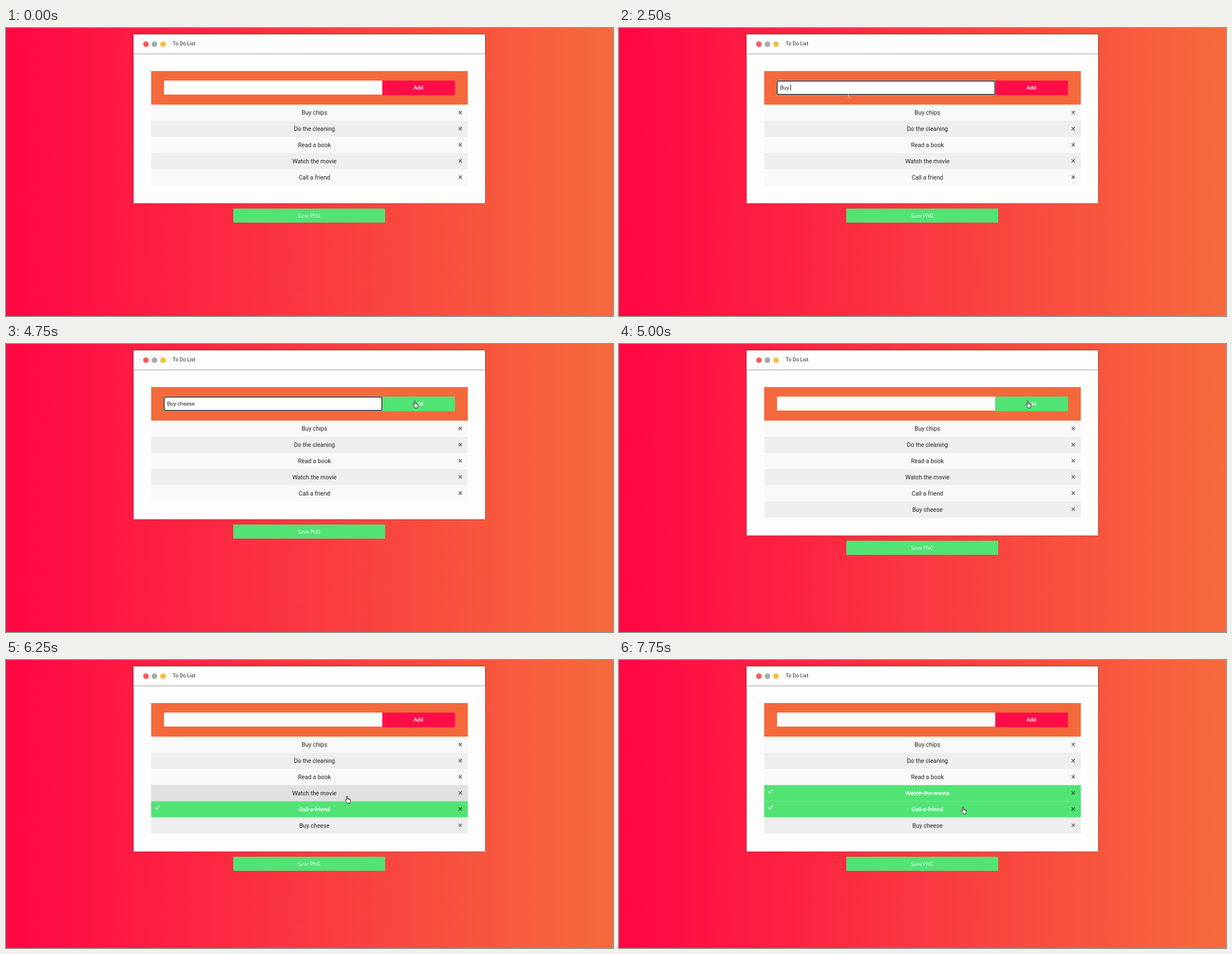
An HTML page that plays this animation: 1087x515 px, repeating every 8 s.

```html
<!DOCTYPE html>
<html lang="en">
<head>
<meta charset="utf-8">
<title>To Do List</title>
<style>
  html, body { margin: 0; width: 100%; height: 100%; overflow: hidden; }
  svg { display: block; width: 1087px; height: 515px; background: linear-gradient(to right, #ff0844 2%, #f56b3c); }
  text { font-family: Roboto, "Open Sans", sans-serif; white-space: pre; fill: #212121; }
  .card { fill: #fdfdfd; filter: drop-shadow(0 0 1.2px rgba(0, 0, 0, .6)); }
  .title { font-size: 9.15px; }
  .entry { font-size: 9.75px; }
  .task { font-size: 10.7px; text-anchor: middle; }
  .button { font-size: 9.6px; font-weight: 500; text-anchor: middle; fill: #fff; }
  .save { font: 8.9px "Open Sans", "Noto Sans", sans-serif; }
  .done { fill: #fff; text-decoration: line-through; }
  .line { fill: none; stroke-linecap: square; }
</style>
</head>
<body>
<svg id="stage" viewBox="0 0 1087 515"></svg>
<script>
const stage = document.getElementById('stage');
const STEP = 250, LOOP = 8000, GREEN = '#51e374', RED = '#ff0d49';
const TASKS = ['Buy chips', 'Do the cleaning', 'Read a book', 'Watch the movie', 'Call a friend', 'Buy cheese'];

// [start time, value]: each value holds until the next start
const TYPED = [[0, ''], [1750, 'B'], [2000, 'Bu'], [2250, 'Buy'], [2500, 'Buy '], [3000, 'Buy c'],
  [3250, 'Buy che'], [3500, 'Buy chees'], [3750, 'Buy cheese'], [5000, '']];
const CARET = [[0, false], [250, true], [1000, false], [1500, true], [4250, false]];
const HOVER = [[0, -1], [5500, 2], [5750, 4], [6250, 3], [7250, 4]];
const POINTER = [[0, ''], [500, 'beam', 408, 117], [4250, 'arrow', 633, 132], [4500, 'hand', 712, 102],
  [4750, 'hand', 728, 101], [5250, 'hand', 726, 103], [5500, 'hand', 652, 204], [5750, 'hand', 605, 264],
  [6250, 'hand', 607, 243], [7000, 'hand', 608, 246], [7250, 'hand', 609, 256], [7500, 'hand', 611, 261],
  [7750, 'hand', 612, 262]];

const SHAPES = {
  beam: '<path class="line" stroke="#ddd" d="M.5 .5H2M4 .5H5.5M3 1V7M.5 7.5H2M4 7.5H5.5"/>',
  arrow: '<path fill="#fff" stroke="#111" stroke-width=".9" d="M.5 .5V9.3L2.5 7.5L4 11L5.6 10.3L4.1 7H6.7Z"/>',
  hand: `<path fill="#fff" stroke="#111" stroke-width=".9" stroke-linejoin="round"
    d="M3 8V1.6Q3 .5 4 .5T5 1.6V5Q6.2 4.3 6.7 5.4Q7.8 4.9 8.2 5.9Q9.6 5.6 9.6 7V9.5Q9.6 11 8.7 12V13.3H4V12.2L.8 8.4Q.3 7.3 1.3 6.9Q2.2 6.9 3 8Z"/>
    <path class="line" stroke="#111" stroke-width=".6" d="M5 5V7M6.7 5.8V7.2M8.2 6.3V7.4"/>`
};

const at = (track, t) => track.findLast(key => key[0] <= t);
const rect = (x, y, w, h, fill, extra = '') =>
  `<rect x="${x}" y="${y}" width="${w}" height="${h}" fill="${fill}" ${extra}/>`;
const text = (x, y, kind, words) => `<text x="${x}" y="${y}" class="${kind}">${words}</text>`;

function taskRow(name, i, t) {
  const y = 137 + i * 28.9;
  const done = i === 4 && t >= 6000 || i === 3 && t >= 6500;
  const fill = done ? GREEN : at(HOVER, t)[1] === i ? '#e0e0e0' : i % 2 ? '#eee' : '#f9f9f9';
  const tick = `<path class="line" stroke="#fff" stroke-width="1.4" d="M267.7 ${y + 11.5}l2.3 2.5l5.2 -5.6"/>`;
  return rect(260, y, 567, 29, fill) +
    text(552.3, y + 18, done ? 'task done' : 'task', name) + (done ? tick : '') +
    `<path class="line" stroke="${done ? '#245c32' : '#686868'}" stroke-width="1.6"
      d="M811.3 ${y + 11.8}l4.4 4.4m0 -4.4l-4.4 4.4"/>`;
}

function draw(t) {
  const added = t >= 5000, grow = added ? 29 : 0;
  const focus = t >= 250 && !added;
  const hot = t >= 4500 && t < 5500;
  const [, shape, px, py] = at(POINTER, t);
  const dots = ['#fa5a5c', '#a8a8a8', '#fdbd41'].map((fill, i) =>
    `<circle cx="${250.6 + i * 15.3}" cy="29" r="5" fill="${fill}"/>`).join('');
  const ring = rect(282, 93.5, 392.5, 26.5, '#fff', 'rx="2"') +
    rect(283.2, 94.7, 390.1, 24.1, '#fff', 'stroke="#101010" stroke-width="1.5" rx="1.2"');

  stage.innerHTML =
    rect(228.5, 11.5, 629.5, 302 + grow, '#fdfdfd', 'class="card"') +
    rect(228.5, 11.5, 629.5, 34.5, '#fdfdfd', 'class="card"') +
    rect(228.5, 45.6, 629.5, 1.3, '#b9b9b9') + dots +
    text(298.5, 31.3, 'title', 'To Do List') +
    rect(260, 77, 567, 60, '#f4693c') +
    rect(673.7, 94, 130.3, 26.2, hot ? GREEN : RED) +
    text(738.5, 110.3, 'button', 'Add') +
    (focus ? ring : rect(283, 94, 390.7, 25, '#fdfdfd')) +
    text(288.5, 109.8, 'entry', at(TYPED, t)[1]) +
    TASKS.slice(0, added ? 6 : 5).map((name, i) => taskRow(name, i, t)).join('') +
    rect(407, 322.8 + grow, 272, 25.2, GREEN) +
    text(543, 338.8 + grow, 'button save', 'Save PNG') +
    (shape ? `<g transform="translate(${px} ${py})">${SHAPES[shape]}</g>` : '');

  if (at(CARET, t)[1]) {
    const x = 288.5 + stage.querySelector('.entry').getComputedTextLength();
    stage.insertAdjacentHTML('beforeend', rect(Math.round(x), 101, 1, 11, '#222'));
  }
}

let shown = -1;
function tick(now) {
  const t = Math.floor(now % LOOP / STEP) * STEP;
  if (t !== shown) draw(shown = t);
  requestAnimationFrame(() => tick(performance.now()));
}
tick(performance.now());
</script>
</body>
</html>
```
